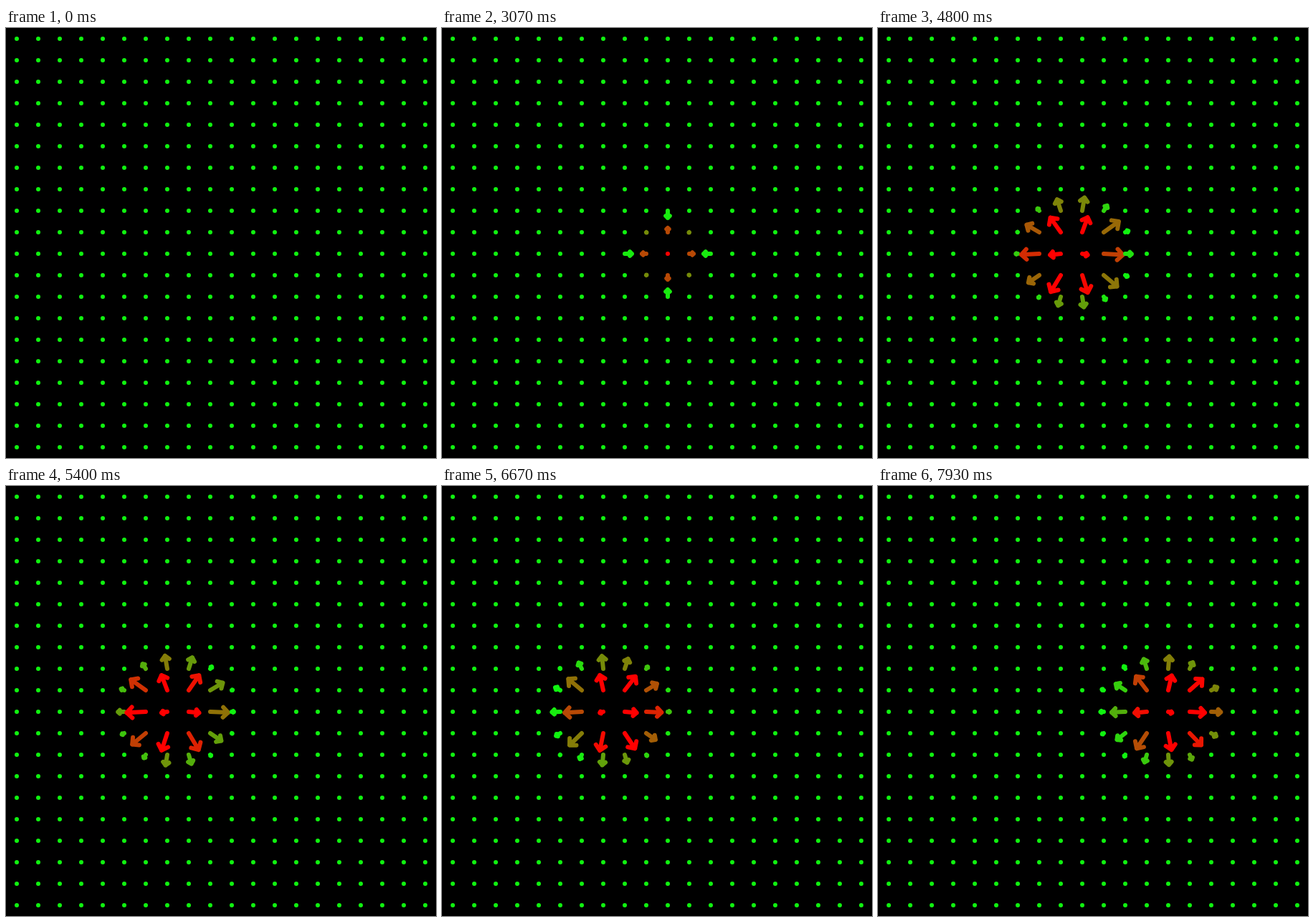
Write an HTML page with a canvas that moves like this. It is 600 px wide and 600 px high and loops after 8 s.

```html
<!DOCTYPE html>
<html lang="en">
<head>
<meta charset="utf-8">
<title>Vector field</title>
<style>
  html, body { margin: 0; width: 100%; height: 100%; overflow: hidden; background: #000; }
  canvas { display: block; }
</style>
</head>
<body>
<canvas id="stage" width="600" height="600"></canvas>
<script>
const ctx = document.getElementById('stage').getContext('2d');
const LOOP = 8000, STEP = 1000 / 15, CELL = 30, COUNT = 20;
const BIRTH = 2670, LAG = 6, DECAY = 0.7;

// Path of the hot spot: time, x, y
const PATH = [
  [0, 315, 315], [3400, 315, 315], [4130, 312, 312.5], [5400, 229, 313],
  [6000, 174, 313], [6133, 180, 313], [7200, 307, 313], [8000, 422, 313]
];

const clamp = (v, lo = 0, hi = 1) => Math.min(hi, Math.max(lo, v));
const mix = (a, b, k) => a + (b - a) * k;

function spotAt(t) {
  let i = 1;
  while (i < PATH.length - 1 && t > PATH[i][0]) i++;
  const [t0, x0, y0] = PATH[i - 1], [t1, x1, y1] = PATH[i];
  const k = clamp((t - t0) / (t1 - t0));
  return { x: mix(x0, x1, k), y: mix(y0, y1, k) };
}

// Recent spots, newest first, sharing the present strength
function trailAt(t) {
  const height = clamp((t - BIRTH) * 0.00345, 0, 1.78);
  const push = clamp((t - 3070) / 450);
  return Array.from({ length: LAG }, (_, j) => ({ ...spotAt(t - j * STEP), height, push }));
}

const heat = (s, d) => s.height - d / 45;

// Signed push along the radius: first partly inward, later fully outward
function force(s, d) {
  const h = heat(s, d);
  if (h <= 0) return 0;
  const early = Math.min((h - 0.45) * 24, d * 0.2);
  const late = Math.min(d * 0.75, 28, h * 40);
  return mix(early, late, s.push);
}

function vectorAt(x, y, trail) {
  let vx = 0, vy = 0, sum = 0, w = 1;
  for (const s of trail) {
    const dx = x - s.x, dy = y - s.y, d = Math.hypot(dx, dy);
    const f = d ? force(s, d) / d : 0;
    vx += dx * f * w;
    vy += dy * f * w;
    sum += w;
    w *= DECAY;
  }
  return [vx / sum, vy / sum];
}

function arrow(x, y, vx, vy, color) {
  const len = Math.hypot(vx, vy);
  if (len < 0.5) {
    ctx.fillStyle = color;
    ctx.beginPath();
    ctx.arc(x, y, 3, 0, Math.PI * 2);
    ctx.fill();
    return;
  }
  const a = Math.atan2(vy, vx), wing = len * 0.4;
  const tx = x + vx, ty = y + vy;
  ctx.strokeStyle = color;
  ctx.beginPath();
  ctx.moveTo(x, y);
  ctx.lineTo(tx, ty);
  for (const side of [-1, 1]) {
    const b = a + side * Math.PI * 0.75;
    ctx.moveTo(tx, ty);
    ctx.lineTo(tx + Math.cos(b) * wing, ty + Math.sin(b) * wing);
  }
  ctx.stroke();
}

function draw(time) {
  const t = Math.floor((time + 5) / STEP) * STEP;
  const trail = trailAt(t), spot = trail[0];
  ctx.fillStyle = '#000';
  ctx.fillRect(0, 0, 600, 600);
  ctx.lineWidth = 6;
  ctx.lineCap = ctx.lineJoin = 'round';
  for (let i = 0; i < COUNT; i++) {
    for (let j = 0; j < COUNT; j++) {
      const x = (i + 0.5) * CELL, y = (j + 0.5) * CELL;
      const h = clamp(heat(spot, Math.hypot(x - spot.x, y - spot.y)));
      const color = `rgb(${mix(16, 255, h)}, ${mix(244, 0, h)}, ${mix(16, 0, h)})`;
      arrow(x, y, ...vectorAt(x, y, trail), color);
    }
  }
}

const start = performance.now();
function tick() {
  draw((performance.now() - start) % LOOP);
  requestAnimationFrame(tick);
}
tick();
</script>
</body>
</html>
```
